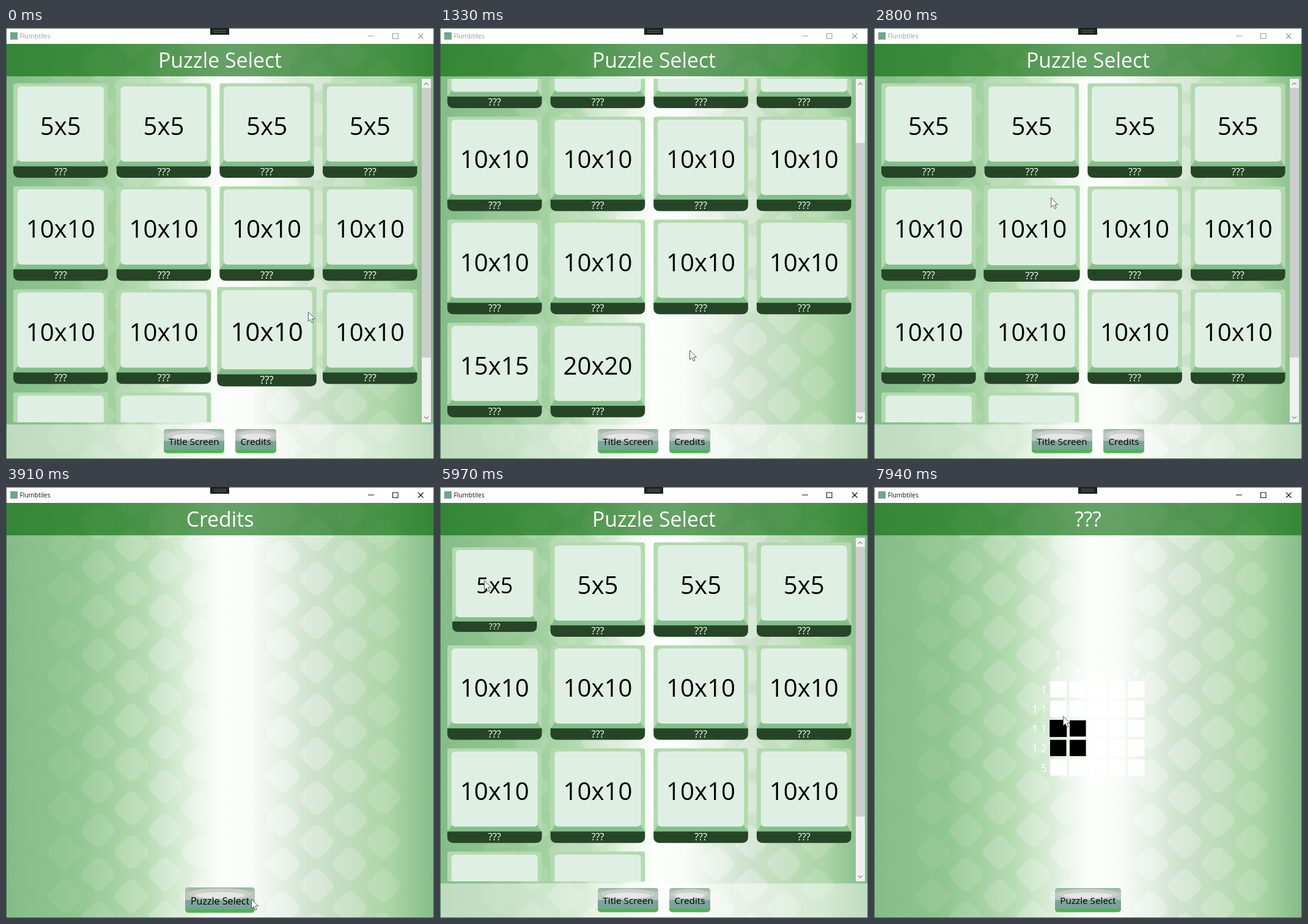
Animation, 700 px wide and 705 px high, one loop 7.99 s. Source, as an HTML page:

```html
<!DOCTYPE html>
<html lang="en">
<head>
<meta charset="utf-8">
<title>Puzzle Select</title>
<style>
html, body { margin: 0; width: 100%; height: 100%; overflow: hidden; background: #fff; }
svg { display: block; width: 700px; height: 705px; font-family: "Open Sans", "Noto Sans", sans-serif; }
text { text-anchor: middle; }
.title { font-size: 33.8px; fill: #fff; }
.size { font-size: 40.2px; }
.name { font-size: 16.4px; fill: #fff; }
.btn { font-size: 15.3px; }
.clue { font-size: 17.6px; fill: #fff; }
.row { text-anchor: end; }
.app { font-size: 10.4px; text-anchor: start; }
</style>
</head>
<body>
<svg viewBox="0 0 700 705">
  <defs>
    <linearGradient id="bg">
      <stop offset="0" stop-color="#84bc88"/>
      <stop offset=".16" stop-color="#90c590"/>
      <stop offset=".32" stop-color="#b4dab0"/>
      <stop offset=".5" stop-color="#fcfefc"/>
      <stop offset=".57" stop-color="#fafcfa"/>
      <stop offset=".71" stop-color="#d0e3cf"/>
      <stop offset=".9" stop-color="#abd5a5"/>
      <stop offset="1" stop-color="#84bc88"/>
    </linearGradient>
    <linearGradient id="face" x1="0" y1="0" x2="0" y2="1">
      <stop offset="0" stop-color="#8fb899"/>
      <stop offset=".25" stop-color="#b9cbbe"/>
      <stop offset=".55" stop-color="#b3c8bd"/>
      <stop offset=".58" stop-color="#7ea69c"/>
      <stop offset="1" stop-color="#74a394"/>
    </linearGradient>
    <clipPath id="list"><rect y="83" width="680" height="562"/></clipPath>
    <clipPath id="body"><rect y="26" width="700" height="679"/></clipPath>
  </defs>

  <rect y="26" width="700" height="679" fill="url(#bg)"/>
  <g id="tiles" clip-path="url(#body)"></g>
  <rect y="26" width="700" height="53" fill="rgba(0,100,0,.6)"/>
  <text id="heading" class="title" x="350" y="65"></text>

  <g id="select">
    <g clip-path="url(#list)"><g id="cards"></g></g>
    <rect x="680" y="83" width="15" height="562" fill="#f0f0f0"/>
    <rect id="thumb" x="680" y="98" width="15" height="441" fill="#cdcdcd"/>
    <path d="M684 93l3.500-3.500 3.500 3.500M684 635.500l3.500 3.500 3.500-3.500" fill="none" stroke="#8c8c8c" stroke-width="1.200"/>
    <rect y="648.500" width="700" height="56.500" fill="#fff" opacity=".47"/>
    <g id="menu"></g>
  </g>
  <g id="puzzle"></g>
  <g id="back"></g>

  <rect width="700" height="26" fill="#fff"/>
  <rect x="7" y="7" width="12" height="12" fill="#6fa78b"/>
  <g id="caption">
    <text class="app" x="22.500" y="17">Flumbtiles</text>
    <path d="M592 13h10M632.500 9h8.500v8.500h-8.500zM674 9l8.500 8.500M682.500 9L674 17.500" fill="none" stroke="currentColor" stroke-width="1.100"/>
  </g>
  <path d="M.5 705V.5H699.500V705M0 704.500H700" fill="none" stroke="#2c5036" stroke-opacity=".8"/>
  <rect x="334" width="31" height="11" fill="#1d211f"/>
  <path d="M339 4h21M339 7h21" stroke="#7d827f" stroke-width=".8"/>

  <path id="cursor" d="M.5 0V15.600L4 12.300 6.500 17.900 9 16.800 6.600 11.400H11.500z" fill="#fff" stroke="#3a4a40" stroke-width=".9"/>
</svg>
<script>
const LOOP = 7990;
const $ = id => document.getElementById(id);
const show = (el, on) => { el.style.display = on ? '' : 'none'; };

// Soft diamonds in staggered columns, fading away from the bright middle
function tileColumn(x, y0, opacity) {
  let s = `<g fill="#fff" opacity="${opacity}">`;
  for (let y = y0; y < 740; y += 71.8)
    s += `<rect x="-22.500" y="-22.500" width="45" height="45" rx="11" transform="translate(${x} ${y}) rotate(45)"/>`;
  return s + '</g>';
}
let tiles = '';
for (let i = 0; i < 10; i++) {
  const right = i > 5;
  const x = right ? 453 + (i - 6) * 54.8 : 41 + i * 54.8;
  const y = right ? 42 - i % 2 * 36 : 59 - i % 2 * 36;
  const fade = 1 - Math.abs(x - 375) / 350;
  tiles += tileColumn(x, y, (right ? .4 : .3) * fade);
}
$('tiles').innerHTML = tiles;

// Interactive part: a node drawn around the centre of its box
function part(parent, box, inner, scrolls) {
  const node = document.createElementNS('http://www.w3.org/2000/svg', 'g');
  node.innerHTML = inner;
  $(parent).append(node);
  return { node, box, scrolls };
}

const cardArt = label => `
  <path d="M-77.300 58V-73.300q0-4 4-4H73.300q4 0 4 4V58z" fill="#b1daad"/>
  <path d="M-77.300 59L-70 49H70L77.300 59z" fill="#84bf8a"/>
  <path d="M-77.300 59L-70 50V46zM77.300 59L70 50V46z" fill="#98cc9a"/>
  <rect x="-70.500" y="-72.300" width="141" height="123" rx="6" fill="#e0efe4"/>
  <path d="M-77.300 58.500H77.300V67.300q0 10-11 10H-66.300q-11 0-11-10z" fill="#264526"/>
  <text class="size" y="7">${label}</text>
  <text class="name" y="73.500">???</text>`;
const label = i => i < 4 ? '5x5' : i < 12 ? '10x10' : i < 13 ? '15x15' : '20x20';
const cards = Array.from({ length: 14 }, (_, i) => part('cards',
  [12 + i % 4 * 168.65, 90.4 + (i >> 2) * 168.6, 154.6, 154.6], cardArt(label(i)), true));

const button = (parent, x, w, text) => part(parent, [x, 656, w, 39.5], `
  <rect x="${-w / 2}" y="-19.700" width="${w}" height="39.500" rx="5" fill="#4cb64c"/>
  <path d="M${-w / 2} 14.500V-14.700q0-5 5-5H${w / 2 - 5}q5 0 5 5V14.500z" fill="url(#face)"/>
  <ellipse cy="-9.500" rx="${w * .46}" ry="9" fill="#cbcecb" stroke="#c3b9be"/>
  <ellipse cy="-7.500" rx="${w * .36}" ry="5" fill="#e4e8e5"/>
  <text class="btn" y="6.500">${text}</text>`);
const buttons = [button('menu', 258, 99, 'Title Screen'), button('menu', 375, 67, 'Credits'),
  button('back', 296, 108, 'Puzzle Select')];

const rowClues = ['1', '1 1', '1 1', '1 2', '5'];
const colClues = ['11', ' 3', '11', ' 4', ' 2'];
const cellBox = (r, c) => [288 + c * 32, 317.6 + r * 32, 26.6, 26.6];
const cellArt = fill => `<rect x="-13.300" y="-13.300" width="26.600" height="26.600" fill="${fill}"/>`;
let clues = '';
for (let i = 0; i < 5; i++) {
  clues += `<text class="clue row" x="283" y="${337.5 + i * 32}">${rowClues[i]}</text>`;
  for (let j = 0; j < 2; j++)
    clues += `<text class="clue" x="${301 + i * 32}" y="${281 + j * 27}">${colClues[i][j]}</text>`;
}
$('puzzle').innerHTML = clues;
const blanks = Array.from({ length: 25 }, (_, i) => part('puzzle', cellBox(i / 5 | 0, i % 5), cellArt('#fff')));
const marks = [[3, 1], [2, 1], [2, 0], [3, 0]].map(([r, c]) => part('puzzle', cellBox(r, c), cellArt('#000')));
const parts = [...cards, ...buttons, ...marks];

// Pointer waypoints and scroll keys: time, then values
const path = [[0, 494, 465], [470, 430, 150], [1330, 408, 527], [2030, 399, 534], [2460, 100, 420],
  [2650, 280, 150], [2735, 290, 246], [2785, 290, 258], [2800, 289, 277], [3500, 410, 674], [3910, 401, 674],
  [4890, 401, 674], [5750, 72, 153], [6130, 72, 153], [6530, 355, 371], [6830, 334, 430], [6990, 334, 430],
  [7200, 333, 395], [7450, 301, 393], [7720, 306, 420], [7925, 309, 384], [7940, 309, 375]];
const scrolling = [[880, 0], [1280, 114], [1690, 114], [2020, 28.7], [2180, 0]];
// Button down, button up, page that opens
const clicks = [[3560, 3650, 'credits'], [4110, 4250, 'select'], [5870, 6060, 'puzzle']];
const headings = { select: 'Puzzle Select', credits: 'Credits', puzzle: '???' };

function at(keys, t) {
  const i = keys.findIndex(k => k[0] > t);
  if (i < 1) return (i ? keys[keys.length - 1] : keys[0]).slice(1);
  const a = keys[i - 1], b = keys[i], u = (t - a[0]) / (b[0] - a[0]);
  return a.slice(1).map((v, j) => v + (b[j + 1] - v) * u);
}

function inside({ box: [left, y0, w, h], scrolls }, t) {
  const [x, y] = at(path, t);
  const top = y0 - (scrolls ? at(scrolling, t)[0] : 0);
  if (scrolls && (y < 83 || y > 645)) return false;
  return x >= left && x <= left + w && y >= top && y <= top + h;
}

// Hover eases over the last few moments of the pointer's path
function place(p, t) {
  const [x, y, w, h] = p.box;
  const hover = [15, 30, 45].filter(d => inside(p, t - d)).length / 3;
  const down = clicks.some(([a, b]) => t >= a && t < b) && inside(p, t);
  const scale = down ? .895 : 1 + .052 * hover;
  p.node.setAttribute('transform', `translate(${x + w / 2} ${y + h / 2}) scale(${scale})`);
}

function draw() {
  const t = performance.now() % LOOP;
  const page = clicks.reduce((now, [, up, next]) => t >= up ? next : now, 'select');
  const [scroll] = at(scrolling, t);
  $('heading').textContent = headings[page];
  show($('select'), page === 'select');
  show($('puzzle'), page === 'puzzle');
  show($('back'), page !== 'select');
  $('cards').setAttribute('transform', `translate(0 ${-scroll})`);
  $('thumb').setAttribute('y', 98 + scroll * .788);
  const ink = t < clicks[0][0] ? '#999' : '#111';
  $('caption').setAttribute('color', ink);
  $('caption').setAttribute('fill', ink);
  parts.forEach(p => place(p, t));
  marks.forEach((m, i) => show(m.node, t >= 7000 + i * 230));
  $('cursor').setAttribute('transform', `translate(${at(path, t).join(' ')})`);
  requestAnimationFrame(draw);
}
blanks.forEach(b => place(b, 0));
draw();
</script>
</body>
</html>
```
